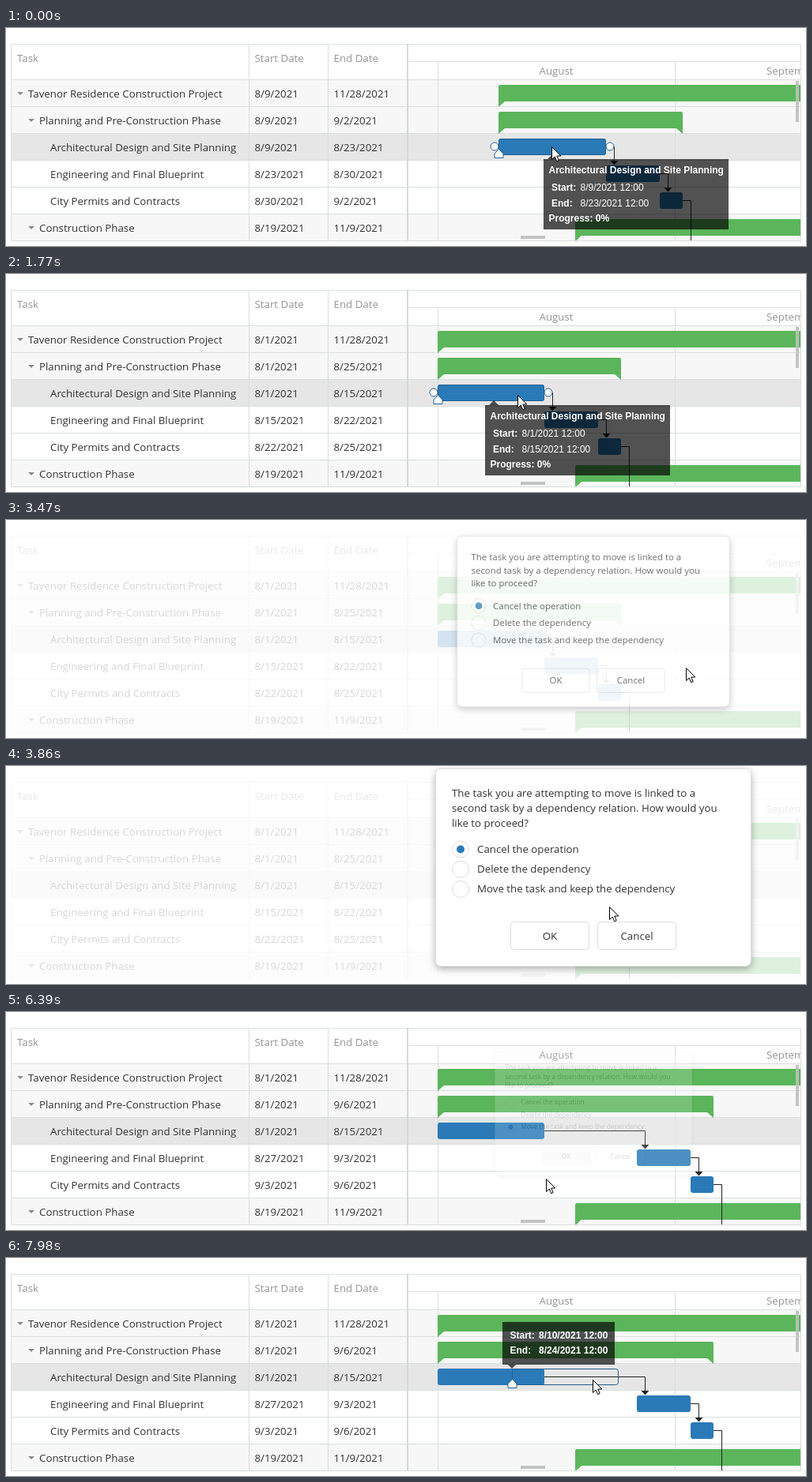
Recreate the animation shown at these times as an HTML page. Size 1012 by 276 pixels, loop 8 s.

```html
<!DOCTYPE html>
<html lang="en">
<head>
<meta charset="utf-8">
<title>Gantt chart</title>
<style>
  html, body { margin: 0; width: 1012px; height: 276px; overflow: hidden; background: #fff; }
  svg { display: block; font: 13.3px "Open Sans", "Noto Sans", sans-serif; fill: #333; }
  .muted { fill: #959595; }
  .line { stroke: #dadfdf; fill: none; }
  .group { fill: #5bb55b; }
  .task { fill: #2a7ab7; }
  .edge { stroke: #235f92; }
  .link { stroke: #222; fill: none; }
  .tip { font: 12px "Liberation Sans", Arial, sans-serif; fill: #fff; }
  .box { fill: #000; opacity: .68; }
  .b { font-weight: bold; }
  .panel { fill: #fff; stroke: #ddd; filter: drop-shadow(0 3px 5px rgba(0, 0, 0, .3)); }
  .control { fill: #fff; stroke: #ddd; }
  .bar { fill: rgba(191, 191, 191, .9); }
  .cursor { fill: #fff; stroke: #000; stroke-linejoin: round; }
</style>
</head>
<body>
<svg id="stage" width="1012" height="276"></svg>
<script>
const LOOP = 8000;
const stage = document.getElementById('stage');
const pen = document.createElement('canvas').getContext('2d');

const rowTop = i => 65 + 34 * i;
const barTop = i => rowTop(i) + 7;
// Days are counted from August 1st.
const dayX = day => Math.floor(546 + 9.7 * day);
const xDay = x => Math.floor((x - 546) / 9.7);
const dateText = day => {
  const d = new Date(2021, 7, 1 + day);
  return `${d.getMonth() + 1}/${d.getDate()}/2021`;
};
const timeText = day => dateText(day) + ' 12:00';

const text = (x, y, s, cls = '') => `<text x="${x}" y="${y}" class="${cls}">${s}</text>`;
const middle = (x, y, s, cls = '') =>
  `<text x="${x}" y="${y}" text-anchor="middle" class="${cls}">${s}</text>`;
const rect = (x, y, w, h, attrs) =>
  `<rect x="${x}" y="${y}" width="${w}" height="${h}" ${attrs}/>`;
const path = (d, attrs) => `<path d="${d}" ${attrs}/>`;
const circle = (x, y, r, attrs) => `<circle cx="${x}" cy="${y}" r="${r}" ${attrs}/>`;
const boldWidth = s => {
  pen.font = 'bold 12px "Liberation Sans", Arial, sans-serif';
  return pen.measureText(s).width;
};

const names = [
  'Tavenor Residence Construction Project', 'Planning and Pre-Construction Phase',
  'Architectural Design and Site Planning', 'Engineering and Final Blueprint',
  'City Permits and Contracts', 'Construction Phase'
];
const indents = [28, 42, 56, 56, 56, 42];

// The three tasks as [start, end], after each edit
const plans = [
  [[8, 22], [22, 29], [29, 32]],
  [[0, 14], [14, 21], [21, 24]],
  [[0, 14], [26, 33], [33, 36]]
];
const planAt = (t, firstDrop) => plans[t < firstDrop ? 0 : t < 6210 ? 1 : 2];
const allRows = plan => [[plan[0][0], 119], [plan[0][0], plan[2][1]], ...plan, [18, 100]];

// Pointer: time, x, y
const keys = [
  [0, 690, 150], [130, 690, 150], [715, 615, 152], [1430, 615, 152], [1770, 647, 153],
  [2130, 743, 188], [2510, 743, 188], [2920, 786, 189], [3300, 868, 188], [3360, 868, 188],
  [3860, 763, 178], [4150, 648, 163], [4620, 581, 155], [5050, 581, 155], [5720, 683, 211],
  [6700, 683, 211], [7230, 648, 152], [7550, 648, 152], [8000, 746, 154]
];

function slope(i, axis) {
  const k = keys[i], a = keys[i - 1] || k, b = keys[i + 1] || k;
  const held = (p, q) => p !== q && p[1] === q[1] && p[2] === q[2];
  if (held(a, k) || held(k, b)) return 0;
  return (b[axis] - a[axis]) / (b[0] - a[0]);
}

function pointerAt(t) {
  const i = keys.findIndex(k => k[0] > t) - 1;
  const a = keys[i], b = keys[i + 1], span = b[0] - a[0], u = (t - a[0]) / span;
  return [1, 2].map(axis =>
    a[axis] + (b[axis] - a[axis]) * u * u * (3 - 2 * u) +
    span * u * (1 - u) * (slope(i, axis) * (1 - u) - slope(i + 1, axis) * u));
}

const drags = [
  { from: 130, to: 730, task: 0, grab: 67 },
  { from: 2520, to: 3340, task: 1, grab: 62 },
  { from: 7560, to: LOOP, task: 0, grab: 102 }
];

function table(t) {
  const rows = allRows(planAt(t, 1030));
  let out = '';
  names.forEach((name, i) => {
    const y = rowTop(i), fill = ['#f7f7f7', '#f7f7f7', '#e6e6e6', '#fff', '#fff', '#f7f7f7'][i];
    out += rect(7, y + 1, 998, 33, `fill="${fill}"`) + path(`M6 ${y + .5}H1006`, 'class="line"');
    const x = indents[i], base = y + 23;
    if (x < 56) out += path(`M${x - 14} ${y + 16}h8l-4 4z`, 'fill="#8c8c8c"');
    out += text(x, base, name);
    rows[i].forEach((day, c) => out += text(314.5 + 100 * c, base, dateText(day)));
  });
  ['Task', 'Start Date', 'End Date'].forEach((s, i) => out += text([14, 314.5, 414.5][i], 43, s, 'muted'));
  return out + path('M6.5 20.5H1005.5V269.5H6.5zM307.5 20V269M407.5 20V269M508 42.5H1005M546.5 42V269M846.5 42V269', 'class="line"') +
    rect(507, 20, 2, 249, 'fill="#d5d9d9"') + middle(696, 59, 'August', 'muted');
}

function groupBar(row, [start, end]) {
  const a = dayX(start), b = dayX(end), y = barTop(row);
  return path(`M${a} ${y + 28}V${y + 2}q0-2 2-2H${b - 2}q2 0 2 2V${y + 28}l-8-7H${a + 8}z`, 'class="group"');
}

function links(plan) {
  return plan.map(([, end], i) => {
    const y = barTop(i + 2) + 10.5, next = plan[i + 1];
    const x = dayX(next ? next[0] : end) + 10.5;
    const line = path(`M${dayX(end)} ${y}H${x}V${next ? y + 20 : 269}`, 'class="link"');
    return line + (next ? path(`M${x - 5} ${y + 17.5}h10l-5 5.5z`, 'fill="#222"') : '');
  }).join('');
}

const progressGrip = (x, y) =>
  path(`M${x + .5} ${y + 13.5}l5.5 5.5v5.5h-11v-5.5z`, 'fill="#fff" class="edge"');

function handles([start, end], y) {
  const a = dayX(start), b = dayX(end), ring = 'fill="#fff" class="edge"';
  return rect(a + .5, y + .5, b - a - 1, 20, 'rx="3" fill="none" class="edge"') +
    circle(a - 5, y + 10, 5, ring) + circle(b + 5, y + 10, 5, ring) + progressGrip(a, y);
}

function tooltip(x, y, w, h, tail, below, body) {
  const arrow = below ? `M${x + tail - 6} ${y}l6-6 6 6z` : `M${x + tail - 5} ${y + h}l5 5 5-5z`;
  return `<g class="tip"><g class="box">${rect(x, y, w, h, '')}${path(arrow, '')}</g>` +
    `<g transform="translate(${x} ${y})">${body}</g></g>`;
}

function hoverTip(task, [start, end], x) {
  const title = names[task + 2], below = task === 0;
  const body = text(6.5, 18, title, 'b') + text(10, 40, 'Start:', 'b') + text(46.5, 40, timeText(start)) +
    text(10, 60, 'End:', 'b') + text(46.5, 60, timeText(end)) + text(6.5, 79, 'Progress: 0%', 'b');
  return tooltip(x - 11, below ? 166 : 80, Math.round(boldWidth(title) + 13), 89, 11, below, body);
}

function dragGhost({ task, grab }, [start, end], px) {
  const x = Math.round(px - grab), y = barTop(task + 2), w = dayX(end) - dayX(start);
  const first = xDay(x), from = timeText(first), to = timeText(first + end - start);
  const body = text(9.5, 21, 'Start:', 'b') + text(46, 21, from, 'b') +
    text(9.5, 40, 'End:', 'b') + text(46, 40, to, 'b');
  const width = Math.round(55 + Math.max(boldWidth(from), boldWidth(to)));
  return rect(x + .5, y + .5, w - 1, 20, 'rx="3" fill="none" class="edge"') + progressGrip(x, y) +
    tooltip(x - 12, y - 59, width, 54, 12, false, body);
}

function chart(t, [px, py]) {
  const plan = planAt(t, 730), rows = allRows(plan);
  const drag = drags.find(d => t >= d.from && t < d.to);
  const idle = drag || (t >= 730 && t < 1430) || (t >= 3340 && t < 6510);
  const hover = idle ? -1 : plan.findIndex(([a, b], i) =>
    px >= dayX(a) && px <= dayX(b) && py >= barTop(i + 2) && py <= barTop(i + 2) + 21);

  let out = text(962, 59, 'September', 'muted') + [0, 1, 5].map(i => groupBar(i, rows[i])).join('');
  plan.forEach(([a, b], i) =>
    out += rect(dayX(a), barTop(i + 2), dayX(b) - dayX(a), 21, 'rx="3" class="task"'));
  out += links(plan) + rect(999, 67, 4, 52, 'class="bar"') + rect(651, 263, 31, 4, 'class="bar"');
  if (hover >= 0) {
    out += handles(plan[hover], barTop(hover + 2));
    if (hover === 0 && t < 2490) out += hoverTip(0, plan[0], t < 130 ? 691 : 617);
    if (hover === 1 && t >= 2490) out += hoverTip(1, plan[1], 743);
  }
  if (drag) out += dragGhost(drag, plan[drag.task], px);
  return `<g clip-path="url(#view)">${out}</g>`;
}

const overOk = (x, y) => x >= 638 && x <= 738 && y >= 197 && y <= 233;

function dialog(t, [px, py]) {
  const ease = since => 1 - (1 - Math.min(1, Math.max(0, (t - since) / 400))) ** 3;
  const shown = t < 6210 ? ease(3340) : 1 - ease(6210);
  if (shown <= 0) return '';
  const picked = t < 4840 ? 0 : 2, focused = picked && t < 5980;
  let out = rect(543.5, 3.5, 399, 250, 'rx="7" class="panel"');
  ['The task you are attempting to move is linked to a',
   'second task by a dependency relation. How would you',
   'like to proceed?'].forEach((s, i) => out += text(564, 39 + 19 * i, s));
  ['Cancel the operation', 'Delete the dependency', 'Move the task and keep the dependency'].forEach((s, i) => {
    const y = 105.5 + 25.2 * i, on = i === picked;
    out += circle(575, y, 10.5, `class="control" ${on && focused ? 'style="stroke:#2a7ab7"' : ''}`);
    if (on) out += circle(575, y, 5, 'class="task"');
    out += text(596, y + 4.5, s);
  });
  const face = t >= 6010 ? '#ebebeb' : t >= 5980 ? '#d4d4d4' : overOk(px, py) ? '#f5f5f5' : '#fff';
  out += rect(638.5, 197.5, 99, 35, `rx="4" class="control" style="fill:${face}"`) + middle(688, 220, 'OK') +
    rect(748.5, 197.5, 99, 35, 'rx="4" class="control"') + middle(798, 220, 'Cancel');
  const shade = t < 6210 ? rect(0, 0, 1012, 276, 'fill="#fff" opacity=".8"') : '';
  return shade + `<g opacity="${shown}" transform="translate(743 128.5) scale(${.55 + .45 * shown}) translate(-743 -128.5)">${out}</g>`;
}

const ARROW = 'M.5.5V16.5L4.2 13 6.7 18.7 9.2 17.6 6.8 12H11.8Z';
const HAND = 'M-1.5 12V1.6a1.6 1.6 0 0 1 3.2 0V7a1.6 1.6 0 0 1 3.2.5a1.6 1.6 0 0 1 3.1.7a1.5 1.5 0 0 1 2.6.9V15L8.5 19V22.5H0V19L-5.4 12a1.7 1.7 0 0 1 2.4-2.3Z' +
  'M4.9 7.5v3.5M8 8.2v3';

function cursor(t, [x, y]) {
  const modal = t >= 3340 && t < 6210;
  const link = modal && (overOk(x, y) || (x >= 564 && x <= 922 && y >= 93 && y <= 168));
  return path(link ? HAND : ARROW, `class="cursor" transform="translate(${Math.round(x)} ${Math.round(y)})"`);
}

function draw(now) {
  const t = now % LOOP, p = pointerAt(t);
  stage.innerHTML = '<clipPath id="view"><path d="M509 21H1005V269H509z"/></clipPath>' +
    table(t) + chart(t, p) + dialog(t, p) + cursor(t, p);
}

const begin = performance.now();
function tick() {
  draw(performance.now() - begin);
  requestAnimationFrame(tick);
}
tick();
</script>
</body>
</html>
```
